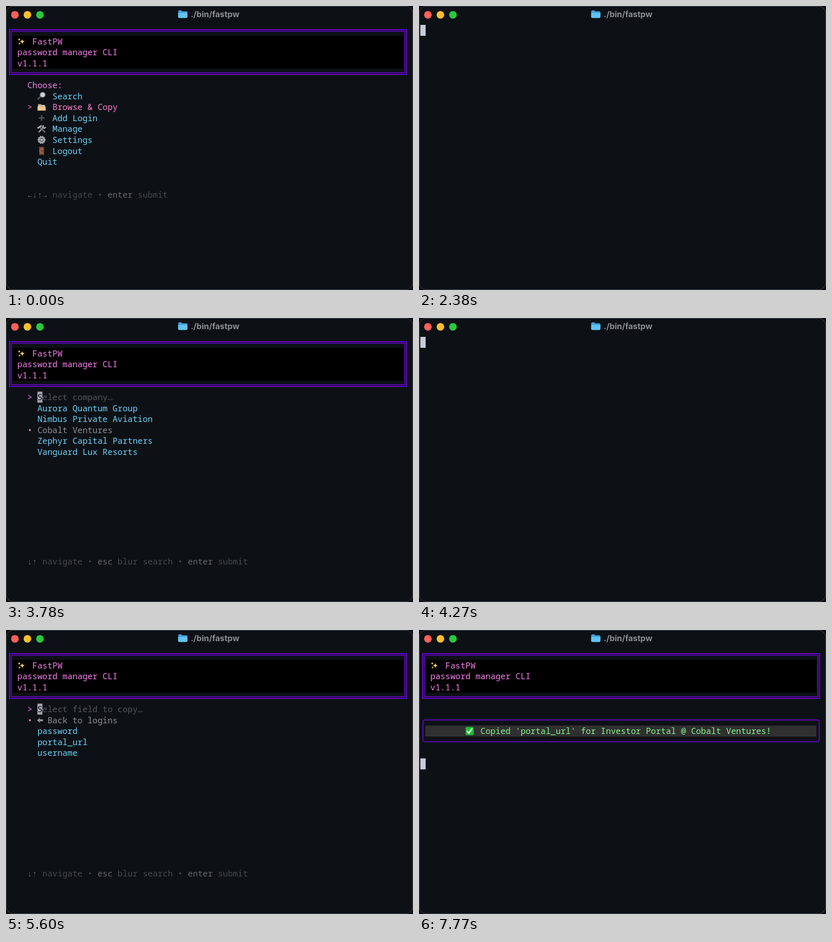
Write an HTML page with a canvas that moves like this. It is 800 px wide and 560 px high and loops after 8000 ms.

```html
<!DOCTYPE html>
<html lang="en">
<head>
<meta charset="utf-8">
<title>./bin/fastpw</title>
<style>
  html, body { margin: 0; width: 100%; height: 100%; overflow: hidden; background: #000; }
  canvas { display: block; }
</style>
</head>
<body>
<canvas id="stage" width="800" height="560"></canvas>
<script>
const ctx = document.getElementById('stage').getContext('2d');

const LOOP = 8000;
const CELL = 9.853, LINE = 21.6, LEFT = 2.6, TOP = 37.2;
const MONO = '16.42px "Noto Sans Mono", "DejaVu Sans Mono", monospace';
const COLOR = {
  back: '#0d1116', pink: '#f780ea', hot: '#fc7dcc', blue: '#6dd3f8', grey: '#8d9094',
  dim: '#44474b', key: '#65686c', faint: '#525559', purple: '#6b06d4', green: '#86f58e',
  cursor: '#c5cedb'
};

const colX = col => LEFT + col * CELL;
const rowY = row => TOP + (row + 0.5) * LINE;

// Terminal text: one glyph per cell.
function text(col, row, string, color) {
  ctx.font = MONO;
  ctx.fillStyle = color;
  [...string].forEach((glyph, i) => ctx.fillText(glyph, colX(col + i), rowY(row) + 5.9));
}

function cells(col, row, width, height, color) {
  ctx.fillStyle = color;
  ctx.fillRect(colX(col), TOP + row * LINE, width * CELL, height * LINE);
}

function disc(x, y, r, color) {
  ctx.fillStyle = color;
  ctx.beginPath();
  ctx.arc(x, y, r, 0, 7);
  ctx.fill();
}

function frame(x1, y1, x2, y2, radius, color, width) {
  ctx.strokeStyle = color;
  ctx.lineWidth = width;
  ctx.beginPath();
  ctx.roundRect(x1, y1, x2 - x1, y2 - y1, radius);
  ctx.stroke();
}

// Shapes are drawn around the given centre.
function shape(x, y, d, color, strokeWidth) {
  ctx.save();
  ctx.translate(x, y);
  const path = new Path2D(d);
  if (strokeWidth) {
    ctx.strokeStyle = color;
    ctx.lineWidth = strokeWidth;
    ctx.lineCap = 'round';
    ctx.stroke(path);
  } else {
    ctx.fillStyle = color;
    ctx.fill(path);
  }
  ctx.restore();
}

const star = (x, y, r) =>
  shape(x, y, `M0 ${-r}Q0 0 ${r} 0Q0 0 0 ${r}Q0 0 ${-r} 0Q0 0 0 ${-r}`, '#ffd45c');

const icons = {
  search(x, y) {
    shape(x, y, 'M-2 1L-7 5.5', '#55585d', 3);
    disc(x + 2, y - 2.5, 5.6, '#8b8f94');
    disc(x + 2, y - 2.5, 4, '#c9d3d9');
  },
  folder(x, y) {
    shape(x, y, 'M-7 -6h6l1 2h7v8h-14z', '#c98f4c');
    shape(x, y, 'M-6 -4h12v3h-12z', '#9fc6d8');
    shape(x, y, 'M-8 -2h5l1 1h10v8h-16z', '#efc68a');
  },
  plus(x, y) {
    shape(x, y, 'M-4.5 0h9M0 -4.5v9', '#494d52', 3);
  },
  tools(x, y) {
    shape(x, y, 'M-5 6L4 -4', '#9b9fa4', 2.4);
    shape(x, y, 'M3 -7l-1 4l3 2l3 -2', '#b8bcc0', 2);
    shape(x, y, 'M-3 -3L6 6', '#6e7378', 2.6);
    shape(x, y, 'M-7 -2L-1 -6', '#aeb2b7', 3);
  },
  gear(x, y) {
    for (let i = 0; i < 10; i++) {
      const a = i * Math.PI / 5;
      disc(x + 6.6 * Math.cos(a), y + 6.6 * Math.sin(a), 1.4, '#b4b8bd');
    }
    disc(x, y, 6.6, '#b4b8bd');
    disc(x, y, 4.4, '#43474c');
    shape(x, y, 'M-4 0h8M-2 -3.5L2 3.5M2 -3.5L-2 3.5', '#a6aaaf', 1.3);
    disc(x, y, 1.8, '#c3c7cb');
  },
  door(x, y) {
    shape(x, y, 'M-5 -8h10v16h-10z', '#70402a');
    shape(x, y, 'M-3 -6h6v5h-6zM-3 1h6v5h-6z', '#9b6041');
    disc(x - 3.5, y, 0.9, '#e0b45f');
  },
  check(x, y) {
    ctx.fillStyle = '#22bd35';
    ctx.beginPath();
    ctx.roundRect(x - 8, y - 8, 16, 16, 2.5);
    ctx.fill();
    shape(x, y, 'M-4.5 0.5L-1.5 4L4.5 -4.5', '#fff', 2.4);
  }
};

function drawWindow() {
  ctx.fillStyle = '#000';
  ctx.fillRect(0, 0, 800, 560);
  ctx.fillStyle = COLOR.back;
  ctx.beginPath();
  ctx.roundRect(0.5, 0.5, 799, 559, 13);
  ctx.fill();
  frame(0.5, 0.5, 799.5, 559.5, 13, '#4b4e52', 1);

  ['#ff6058', '#ffbd2e', '#28c840'].forEach((color, i) => disc(17.5 + i * 24.6, 17.4, 7.5, color));
  shape(347.5, 16.5, 'M-9 -6q0 -2 2 -2h4l2 2h8q2 0 2 2v9q0 2 -2 2h-14q-2 0 -2 -2z', '#3b9fd6');
  shape(347.5, 16.5, 'M-9 -3h18v8q0 2 -2 2h-14q-2 0 -2 -2z', '#62c3f2');
  ctx.font = 'bold 16px Inter, sans-serif';
  ctx.fillStyle = '#8b8e90';
  ctx.fillText('./bin/fastpw', 363, 22.3);
}

function drawBanner() {
  cells(1, 1, 78, 3, '#000');
  frame(6.9, 46.8, 787.4, 134.9, 0, COLOR.purple, 1.9);
  frame(10.1, 50, 784.2, 131.6, 0, COLOR.purple, 1.7);
  star(32, 70, 6);
  star(26, 66, 3.4);
  star(26.5, 74, 3);
  text(5, 1, 'FastPW', COLOR.pink);
  text(2, 2, 'password manager CLI', COLOR.pink);
  text(2, 3, 'v1.1.1', COLOR.pink);
}

// Alternating [keys, meaning] pairs separated by dots.
function drawHints(row, hints) {
  let col = 4;
  hints.forEach(([keys, meaning], i) => {
    if (i) {
      text(col + 1, row, '•', COLOR.dim);
      col += 3;
    }
    text(col, row, keys, COLOR.key);
    col += keys.length + 1;
    text(col, row, meaning, COLOR.dim);
    col += meaning.length;
  });
}

const menu = [
  ['search', 'Search'], ['folder', 'Browse & Copy'], ['plus', 'Add Login'],
  ['tools', 'Manage'], ['gear', 'Settings'], ['door', 'Logout'], [null, 'Quit']
];

function drawMenu() {
  drawBanner();
  text(4, 5, 'Choose:', COLOR.pink);
  menu.forEach(([icon, label], i) => {
    const row = 6 + i, selected = i === 1;
    if (selected) text(4, row, '>', COLOR.hot);
    if (icon) icons[icon](70, rowY(row));
    text(icon ? 9 : 6, row, label, selected ? COLOR.hot : COLOR.blue);
  });
  drawHints(15, [['←↓↑→', 'navigate'], ['enter', 'submit']]);
}

function drawPicker(prompt, options, selected, cursorOn) {
  drawBanner();
  text(4, 5, '>', COLOR.pink);
  text(6, 5, prompt, COLOR.faint);
  if (cursorOn) {
    cells(6, 5, 1, 1, '#a1a4a8');
    text(6, 5, prompt[0], '#1c1f23');
  }
  options.forEach((label, i) => {
    const row = 6 + i, color = i === selected ? COLOR.grey : COLOR.blue;
    if (i === selected) text(4, row, '•', COLOR.hot);
    const isBack = label.startsWith('Back');
    if (isBack) shape(67, rowY(row) + 0.5, 'M-6 0L-0.5 -5v3h6v4h-6v3z', color);
    text(isBack ? 8 : 6, row, label, color);
  });
  drawHints(20, [['↓↑', 'navigate'], ['esc', 'blur search'], ['enter', 'submit']]);
}

function drawCopied(cursorOn) {
  drawBanner();
  cells(1, 7, 78, 1, '#303030');
  frame(7.7, 177.4, 786.6, 220.4, 4, COLOR.purple, 1.7);
  icons.check(99.5, rowY(7));
  text(12, 7, "Copied 'portal_url' for Investor Portal @ Cobalt Ventures!", COLOR.green);
  if (cursorOn) cells(0, 10, 1.06, 1, COLOR.cursor);
}

const companies = ['Aurora Quantum Group', 'Nimbus Private Aviation', 'Cobalt Ventures',
  'Zephyr Capital Partners', 'Vanguard Lux Resorts'];
const logins = ['Back', 'Investor Portal'];
const fields = ['Back to logins', 'password', 'portal_url', 'username'];

const passed = (t, ...times) => times.filter(time => t >= time).length;
const blank = () => cells(0, 0, 1.06, 1, COLOR.cursor);

// Each scene runs from its start time until the next one.
const scenes = [
  [0, drawMenu],
  [2380, blank],
  [2450, t => drawPicker('Select company…', companies, passed(t, 3150, 3640), t < 3080 || t >= 3640)],
  [4200, blank],
  [4340, t => drawPicker('Select login…', logins, passed(t, 4900), t < 4900)],
  [5180, blank],
  [5320, t => drawPicker('Select field to copy…', fields, passed(t, 5740, 5810), t < 5880)],
  [6160, blank],
  [6230, t => drawCopied(t < 7070 || t >= 7700)]
];

const start = performance.now();

function render(now) {
  const t = Math.max(0, now - start) % LOOP;
  drawWindow();
  scenes.findLast(([from]) => t >= from)[1](t);
  requestAnimationFrame(render);
}
render(start);
</script>
</body>
</html>
```
